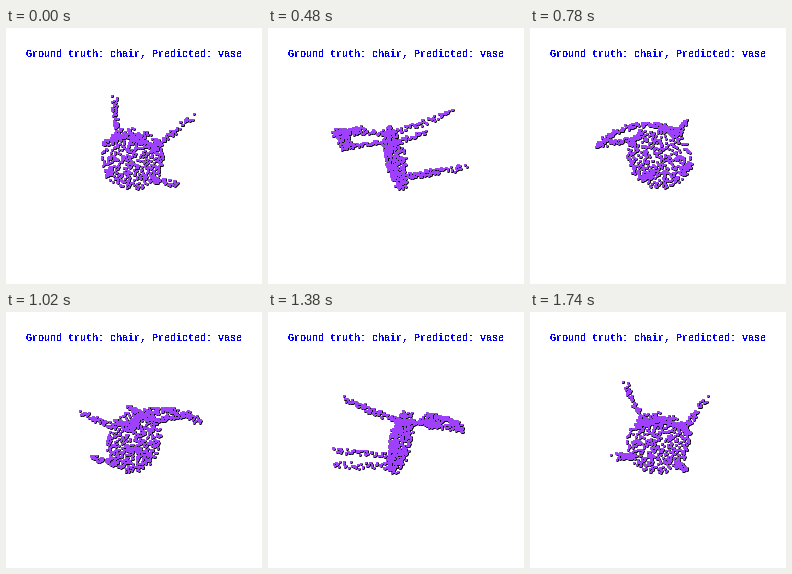
Recreate the animation shown at these times as a matplotlib script. Size 256x256 px, loop 1.8 s.

```python
import matplotlib.pyplot as plt
import numpy as np
from matplotlib.animation import FuncAnimation

SIZE, DPI = 256, 100
FRAMES, STEP = 30, 60
MID, DIST = 128, 190          # screen centre, camera distance
PX = 72 / DPI                 # points per pixel

rng = np.random.default_rng(7)

# Seat frame: x right, y down, z towards the viewer
CENTRE = np.array([-1, 1.5, -2.5])
U = np.array([0.974, 0.169, -0.15])
V = np.array([-0.148, 0.961, 0.235])
NORMAL = np.cross(U, V)


def on_seat(x, y):
    dx, dy = x - CENTRE[0], y - CENTRE[1]
    z = CENTRE[2] - (NORMAL[0] * dx + NORMAL[1] * dy) / NORMAL[2]
    return np.array([x, y, z])


def spread(n):
    """Jittered, evenly covering values from 0 to 1."""
    return ((np.arange(n) + rng.uniform(0, 1, n)) / n)[:, None]


def disc(n, radius, thick):
    r = radius * np.sqrt(spread(n))
    a = rng.uniform(0, 2 * np.pi, (n, 1))
    depth = rng.uniform(-thick, thick, (n, 1))
    return CENTRE + r * np.cos(a) * U + r * np.sin(a) * V + depth * NORMAL


def rod(start, end, n, width):
    side = rng.uniform(-width, width, (n, 3))
    return start + (np.array(end) - start) * spread(n) + side


def arc(t, left, mid, right):
    """Quadratic curve through three points."""
    a, b, c = (np.array(p) for p in (left, mid, right))
    return a * (1 - t) * (1 - 2 * t) + 4 * b * t * (1 - t) + c * t * (2 * t - 1)


def band(n):
    t = spread(n)
    h = rng.uniform(0, 1, (n, 1)) * np.where(abs(t - 0.4) > 0.25, 0.5, 1)
    top = arc(t, (-41, -14, -52), (-5, -22, -58), (30, -6, -59))
    low = arc(t, (-36, -19, -28), (0, -26, -33), (30, -12, -35))
    return top + (low - top) * h + rng.uniform(-1.5, 1.5, (n, 3))


POINTS = np.vstack([
    disc(500, 32, 2.5),
    rod(on_seat(-17, -21), (-15, -42, 52), 60, 2.6),
    rod(on_seat(25, -12), (44, -30, 42), 60, 2.6),
    rod(on_seat(18, 24), (31, 20, 55), 56, 2.6),
    rod(on_seat(-24, 17), (-17, 11, 64), 56, 2.6),
    rod(on_seat(-22, -20), (-25, -21, -54), 60, 2.2),
    rod(on_seat(24, -16), (25, -9, -59), 60, 2.2),
    band(180),
])


def project(angle):
    x, y, z = POINTS.T
    c, s = np.cos(angle), np.sin(angle)
    scale = DIST / (DIST - (z * c - x * s))
    return MID + (x * c + z * s) * scale, MID + y * scale


fig = plt.figure(figsize=(SIZE / DPI, SIZE / DPI), dpi=DPI, facecolor="white")
ax = fig.add_axes([0, 0, 1, 1])
ax.set(xlim=(0, SIZE), ylim=(SIZE, 0))
ax.axis("off")
ax.text(MID, 29, "Ground truth: chair, Predicted: vase", color="#0000ff",
        family="Liberation Mono", weight="bold", size=10 * PX,
        ha="center", va="baseline", antialiased=False)


def dots(color, marker, px):
    return ax.plot([], [], marker, color=color, ms=px * PX, mew=0,
                   antialiased=False)[0]


layers = [dots("black", "o", 2.9), dots("#a040ff", "s", 2)]


def update(i):
    x, y = project(2 * np.pi * i / FRAMES)
    for layer in layers:
        layer.set_data(x, y)
    return layers


anim = FuncAnimation(fig, update, frames=FRAMES, interval=STEP,
                     repeat=True, repeat_delay=0)
plt.show()
```
